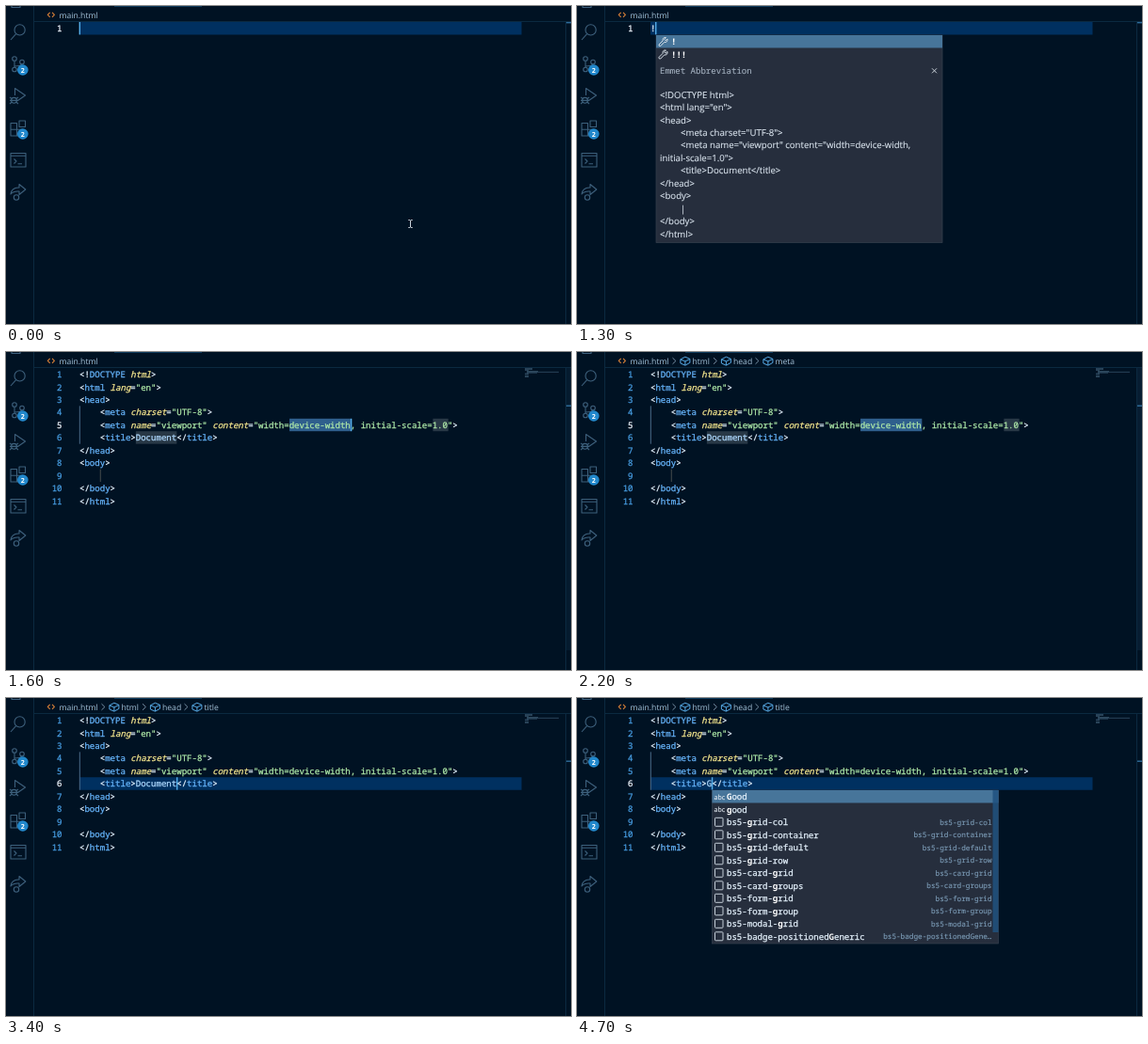
Animation, 600 px wide and 338 px high, one loop 5000 ms. Source, as an HTML page:

```html
<!DOCTYPE html>
<html lang="en">
<head>
<meta charset="UTF-8">
<title>Editor</title>
<style>
html, body { margin: 0; width: 100%; height: 100%; overflow: hidden; background: #001223; }
svg { display: block; width: 600px; height: 338px; }
text { white-space: pre; text-rendering: geometricPrecision; color: #e4f1fc; }
text, tspan { fill: currentColor; stroke: currentColor; stroke-width: 0; }
.code, .code tspan { stroke-width: 0.28; }
.code { font: 9.067px "Noto Sans Mono", "DejaVu Sans Mono", monospace; }
.ui { font: 8.6px "Open Sans", "Noto Sans", sans-serif; color: #a6c2d8; }
.doc { font: 9.6px "Open Sans", "Noto Sans", sans-serif; color: #dbe5ef; stroke-width: 0.12; }
.hint { font: 7.7px "Noto Sans Mono", "DejaVu Sans Mono", monospace; color: #7d9db8; stroke-width: 0.12; text-anchor: end; }
.tag { color: #66b4fa; }
.attr { color: #f5e68e; font-style: italic; }
.str { color: #aee8a8; }
.plain { color: #aed8fd; }
.num { color: #469ce0; text-anchor: end; }
.on { color: #f2f8ff; }
.bold { font-weight: 700; color: #fff; }
.code .bold, .code.bold { stroke-width: 0; }
.icon { fill: none; stroke: #3d607c; stroke-width: 1.1; stroke-linejoin: round; }
</style>
</head>
<body>
<svg id="stage" viewBox="0 0 600 338"></svg>
<script>
const LOOP = 5000, CHAR = 5.44, LEFT = 78, ROW = 13.45;
const stage = document.getElementById('stage');
const cues = [];

function add(parent, name, attrs = {}, content) {
  const node = document.createElementNS('http://www.w3.org/2000/svg', name);
  for (const key in attrs) node.setAttribute(key, attrs[key]);
  if (content !== undefined) node.textContent = content;
  return parent.appendChild(node);
}
const rect = (p, x, y, width, height, fill, more) => add(p, 'rect', { x, y, width, height, fill, ...more });
const path = (p, d, more) => add(p, 'path', { d, class: 'icon', ...more });
const ring = (p, cx, cy, r, more) => add(p, 'circle', { cx, cy, r, class: 'icon', ...more });
const text = (p, x, y, cls, content, more) => add(p, 'text', { x, y, class: cls, ...more }, content);

// A group visible only during the given [from, to) spans.
function during(...spans) {
  const node = add(stage, 'g');
  cues.push({ node, spans });
  return node;
}
const rowTop = line => 17 + (line - 1) * ROW;
const baseline = line => rowTop(line) + 10.1;
const colX = col => LEFT + col * CHAR;

function codeLine(p, line, source) {
  const node = text(p, LEFT, baseline(line), 'code');
  const parts = /(<[!\/]?)(\w+)|("[^"]*")|([a-z]+)(?=[=>])|(\w+)|(.)/g;
  const span = (cls, s) => s && add(node, 'tspan', { class: cls }, s);
  for (const [, open, tag, str, attr, word, other] of source.matchAll(parts)) {
    span('', open);
    span('tag', tag);
    span('str', str);
    span('attr', attr);
    span('plain', word);
    span('', other);
  }
}
function lineNumber(p, line, active) {
  text(p, 59.5, baseline(line), 'code num' + (active ? ' on' : ''), line);
}
function lineHighlight(p, line) {
  rect(p, LEFT, rowTop(line), 469.5, 13.5, '#003060');
  rect(p, 595, line === 1 ? 17 : 16.5 + (line - 1) * 10, 5, 1.4, '#2f6d9c');
}
function caret(line, col, ...spans) {
  rect(during(...spans), colX(col) - 0.4, rowTop(line), 1.4, 13.4, '#55aeea');
}

// Frame of the editor
rect(stage, 0, 0, 600, 338, '#001223');
rect(stage, 29, 0, 1, 338, '#0b2940');
rect(stage, 30, 16, 570, 1, '#0b2940');
rect(stage, 594, 17, 1, 321, '#0b2940');
rect(stage, 115, 0, 93, 1, '#0e3a5c');

// Activity bar
path(stage, 'M6 0V1.5H15V0');
ring(stage, 14.6, 25.4, 5.6);
path(stage, 'M10.6 29.6L5 36');
ring(stage, 9, 56, 2.3);
ring(stage, 17, 59.5, 2.3);
ring(stage, 9, 67.5, 2.3);
path(stage, 'M9 58.3V65.2M17 61.8Q16 64 9 64');
path(stage, 'M9.5 95V87.5L20.5 95L12.5 100.5');
ring(stage, 8.5, 100.3, 2.9);
path(stage, 'M4 97L6.2 98.6M13 97L10.8 98.6M4 100.4H13M4 104L6.2 102M13 104L10.8 102');
path(stage, 'M5 124.5H11.5V138H5ZM5 131.2H18V138H11.5M14 122H20.5V128.5H14Z');
path(stage, 'M5 156.5H21V171H5ZM5 159.3H21M8.5 162.5L11 165L8.5 167.5M12.5 167.8H17');
path(stage, 'M5 200Q6 192.5 14 193V189.5L20.8 195L14 200.5V197Q8 196.5 5 200Z');
ring(stage, 11, 203.5, 2.7);
for (const y of [68, 136]) {
  add(stage, 'circle', { cx: 17.8, cy: y, r: 5.8, fill: '#2187cb' });
  text(stage, 17.8, y + 2.6, 'ui bold', '2', { 'text-anchor': 'middle', style: 'font-size:7px' });
}

// Breadcrumbs
path(stage, 'M46.7 6.8L44.3 9.3L46.7 11.8M49 6.8L51.4 9.3L49 11.8', { style: 'stroke:#d98138' });
text(stage, 56.6, 12.5, 'ui', 'main.html');
function crumb(p, x, label) {
  path(p, `M${x} 6.2l3.4 3.3l-3.4 3.3`, { style: 'stroke:#7891a5;stroke-width:1' });
  path(p, `M${x + 8.4} 7.8l5-2.6l5 2.2v4l-5 2.8l-5-2.2zl5 2.1l5-2.5m-5 2.5v4.1`, { style: 'stroke:#58a9e4;stroke-width:1' });
  text(p, x + 21, 12.5, 'ui', label);
}
const crumbs = during([2200, LOOP]);
crumb(crumbs, 101.5, 'html');
crumb(crumbs, 145, 'head');
crumb(during([2200, 2800]), 189.5, 'meta');
crumb(during([2800, LOOP]), 189.5, 'title');

// Empty document
const empty = during([0, 1600]);
lineHighlight(empty, 1);
lineNumber(empty, 1, true);
text(during([1300, 1600]), LEFT, baseline(1), 'code', '!');

// Expanded document
lineHighlight(during([2600, LOOP]), 6);
const snippet = during([1600, 2600]);
rect(snippet, colX(41), rowTop(5), CHAR * 12, 13.4, '#2f5f8d');
rect(snippet, colX(69), rowTop(5), CHAR * 3, 13.4, '#283846');
rect(snippet, colX(11), rowTop(6), CHAR * 8, 13.4, '#283846');
rect(snippet, colX(4), rowTop(9), 1, 13.4, '#454b4d');
rect(snippet, 595, 56.5, 5, 1.4, '#2f6d9c');

const page = during([1600, LOOP]);
rect(page, LEFT - 0.2, rowTop(4), 1, ROW * 3, '#4a6b89');
[
  '<!DOCTYPE html>', '<html lang="en">', '<head>',
  '    <meta charset="UTF-8">',
  '    <meta name="viewport" content="width=device-width, initial-scale=1.0">',
  '', '</head>', '<body>', '', '</body>', '</html>'
].forEach((source, i) => {
  codeLine(page, i + 1, source);
  if (i !== 4 && i !== 5) lineNumber(page, i + 1);
});
lineNumber(snippet, 5, true);
lineNumber(snippet, 6);
const titleLine = during([2600, LOOP]);
lineNumber(titleLine, 5);
lineNumber(titleLine, 6, true);
const titleText = (word, from, to) => codeLine(during([from, to]), 6, `    <title>${word}</title>`);
titleText('Document', 1600, 3900);
titleText('', 3900, 4700);
titleText('G', 4700, LOOP);

// Minimap
[[0, 8], [0, 8], [0, 4], [2, 12], [2, 34], [2, 11], [0, 4], [0, 4], [0, 0], [0, 4], [0, 4]].forEach(([x, w], i) =>
  rect(page, 551 + x, 17.3 + i * 0.9, w, 0.6, '#5b7f9b', { opacity: 0.75 }));

const slider = rect(stage, 595, 17, 5, 300, '#4f8fc0');

caret(1, 0, [0, 500], [1000, 1300]);
caret(1, 1, [1300, 1600]);
caret(5, 53, [1600, 2100]);
caret(6, 27, [2600, 3100]);
caret(6, 19, [3300, 3800]);
caret(6, 11, [3900, 4400]);
caret(6, 12, [4700, LOOP]);

// Suggestion lists
function popup(p, x, y, width, height) {
  rect(p, x, y, width, height, '#262e3d', { stroke: '#35404f', 'stroke-width': 0.7 });
  rect(p, x, y, width, 13.5, '#47759a');
}
const emmet = during([1300, 1600]);
popup(emmet, 84, 31, 304, 220.5);
['!', '!!!'].forEach((label, i) => {
  const y = 37.8 + i * ROW;
  path(emmet, `M87 ${y + 3.2}l4.2-4.2q-.7-3.5 3.2-3.3l-1.7 1.9l1.4 1.4l1.9-1.8q.5 4-3.3 3.5l-4 4.1q-2.2.3-1.7-1.6z`,
    { style: 'stroke:#d7e0e8;stroke-width:1' });
  text(emmet, 100, y + 3.4, 'code bold', label);
});
text(emmet, 88, 72.3, 'code', 'Emmet Abbreviation', { style: 'color:#a5b2c1;stroke-width:0.1' });
path(emmet, 'M377 66.3l5 5m0-5l-5 5', { style: 'stroke:#c8d0d8;stroke-width:1' });
[
  [0, '<!DOCTYPE html>'], [0, '<html lang="en">'], [0, '<head>'],
  [1, '<meta charset="UTF-8">'],
  [1, '<meta name="viewport" content="width=device-width,'],
  [0, 'initial-scale=1.0">'],
  [1, '<title>Document</title>'], [0, '</head>'], [0, '<body>'],
  [1, '|'], [0, '</body>'], [0, '</html>']
].forEach(([indent, line], i) => text(emmet, 88 + indent * 22, 97.6 + i * 13.45, 'doc', line));

const words = during([4700, LOOP]);
popup(words, 143.5, 98, 304, 163);
rect(words, 441.5, 98, 6, 151, '#1f527f', { opacity: 0.85 });
[
  '*Good', '*good', 'bs5-*grid-col', 'bs5-*grid-container', 'bs5-*grid-default', 'bs5-*grid-row',
  'bs5-card-*grid', 'bs5-card-*groups', 'bs5-form-*grid', 'bs5-form-*group', 'bs5-modal-*grid',
  'bs5-badge-positioned*Generic'
].forEach((item, i) => {
  const y = 108.1 + i * 13.5;
  const [head, tail] = item.split('*');
  const label = text(words, 159, y, 'code', head);
  add(label, 'tspan', { class: 'bold' }, tail[0]);
  add(label, 'tspan', {}, tail.slice(1));
  if (i < 2) {
    text(words, 145.5, y - 0.4, 'ui', 'abc', { style: 'font-size:7px;color:#e2e9f0;stroke-width:0.15' });
    return;
  }
  rect(words, 146.5, y - 7.8, 8.5, 9, 'none', { stroke: '#c4ced8', rx: 0.8 });
  const full = head + tail;
  const hint = full.length > 24 ? full.slice(0, 24) + '…' : full;
  text(words, 440.5, y - 0.2, 'hint', hint);
});

// Mouse pointer
path(during([0, 100]), 'M427.3 227.5h1.6l.6.6l.6-.6h1.6M429.5 228v7M427.3 235.5h1.6l.6-.6l.6.6h1.6',
  { style: 'stroke:#c9d2da;stroke-width:1' });

const ramp = (t, from, to) => Math.min(1, Math.max(0, (t - from) / (to - from)));
function draw(now) {
  const t = now % LOOP;
  for (const { node, spans } of cues) {
    const visible = spans.some(([from, to]) => t >= from && t < to);
    node.setAttribute('visibility', visible ? 'visible' : 'hidden');
  }
  slider.setAttribute('opacity', 0.14 * (ramp(t, 1500, 1700) - ramp(t, 2100, 2400)));
}
const start = performance.now();
function tick() {
  draw(performance.now() - start);
  requestAnimationFrame(tick);
}
tick();
</script>
</body>
</html>
```
